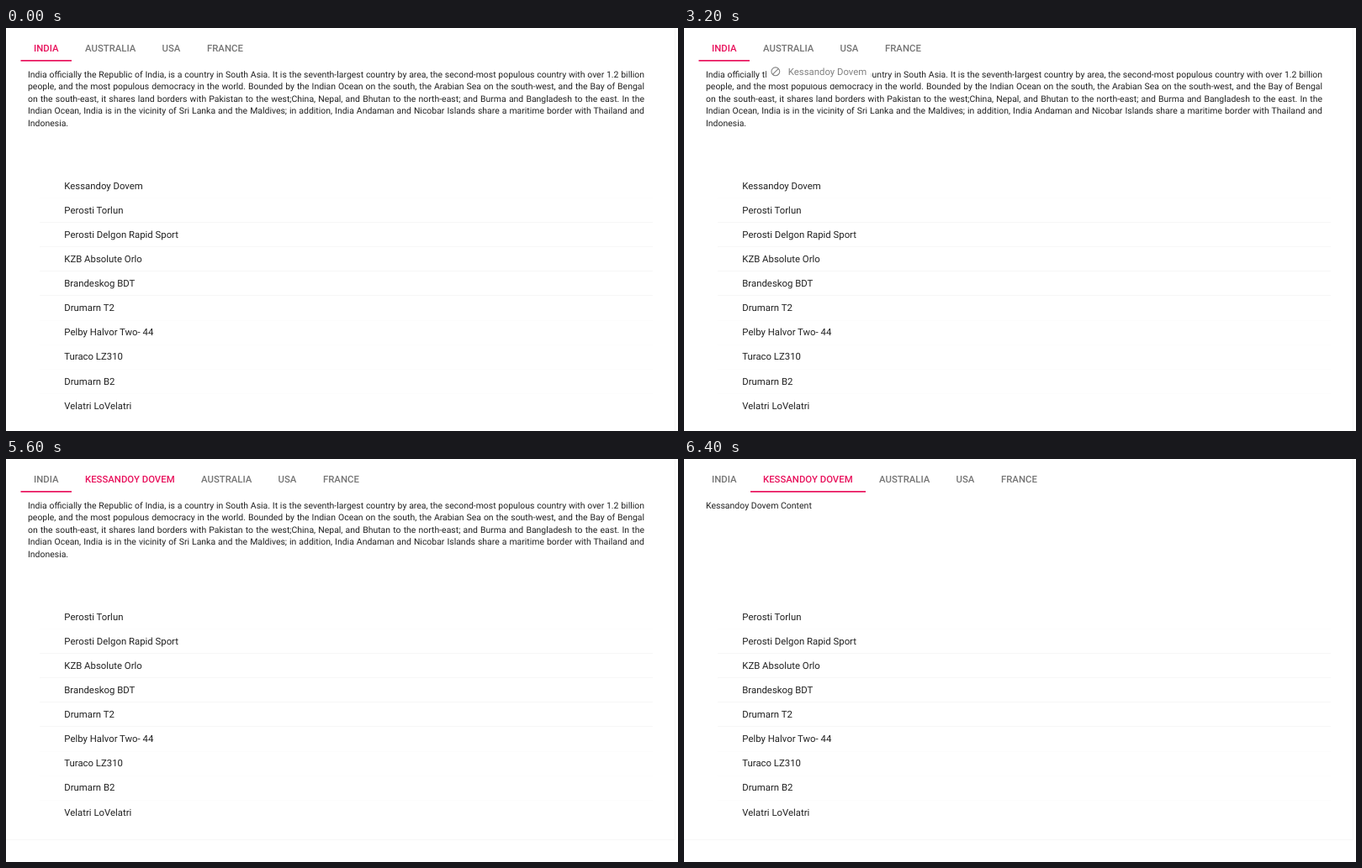
An HTML page that plays this animation: 799 px wide and 480 px high, repeating every 9900 ms.

```html
<!DOCTYPE html>
<html lang="en">
<head>
<meta charset="utf-8">
<title>Drag list item to tabs</title>
<style>
html, body { margin: 0; width: 100%; height: 100%; overflow: hidden; background: #fff; }
svg { display: block; width: 799px; height: 480px; text-rendering: geometricPrecision; }
svg, .para { font-family: Roboto, Arial, sans-serif; }
text { font-size: 11.36px; fill: #212121; white-space: pre; }
.tab { font-weight: 500; }
.note { font-size: 12.35px; }
.para { font-size: 10.45px; line-height: 14.55px; color: #212121; text-align: justify; text-align-last: justify; }
.para div { white-space: nowrap; }
.para div:last-child { text-align-last: left; }
</style>
</head>
<body>
<svg id="stage" viewBox="0 0 799 480">
  <defs>
    <clipPath id="panel"><rect id="panelBox" x="17" y="42" width="752" height="80"/></clipPath>
  </defs>
  <g id="tabs"></g>
  <rect id="indicator" y="38" height="1.7" fill="#e8125c"/>
  <g clip-path="url(#panel)">
    <g id="slider">
      <foreignObject id="country" x="26" y="48.5" width="733" height="74">
        <div class="para" xmlns="http://www.w3.org/1999/xhtml">
          <div>India officially the Republic of India, is a country in South Asia. It is the seventh-largest country by area, the second-most populous country with over 1.2 billion</div>
          <div>people, and the most populous democracy in the world. Bounded by the Indian Ocean on the south, the Arabian Sea on the south-west, and the Bay of Bengal</div>
          <div>on the south-east, it shares land borders with Pakistan to the west;China, Nepal, and Bhutan to the north-east; and Burma and Bangladesh to the east. In the</div>
          <div>Indian Ocean, India is in the vicinity of Sri Lanka and the Maldives; in addition, India Andaman and Nicobar Islands share a maritime border with Thailand and</div>
          <div>Indonesia.</div>
        </div>
      </foreignObject>
      <text id="newContent" x="759" y="59.2" style="font-size:10.5px"></text>
    </g>
  </g>
  <g id="hover">
    <rect x="18" y="175" width="386" height="25.5" fill="#f6f6f6"/>
    <rect x="38" y="175" width="1" height="25.5" fill="#dcdcdc"/>
  </g>
  <g id="page">
    <path id="frame" fill="none" stroke="#f7f7f7"/>
    <g id="lines"></g>
    <g id="rows"></g>
    <text class="note" x="-11" y="495.5">The</text>
    <text x="17" y="495.5" style="fill:#e8125c">Tab</text>
    <text class="note" x="43" y="495.5">is a content panel to show multiple contents in specific space one at a time.</text>
  </g>
  <g id="clone">
    <rect x="107.5" y="64" width="125" height="29" fill="#fff"/>
    <g id="denied" fill="none" stroke="#858585" stroke-width="1.1">
      <circle cx="118.5" cy="78" r="4.9"/><path d="M115 81.5l7-7"/>
    </g>
    <g id="allowed">
      <circle cx="118.5" cy="78" r="5.2" fill="#6b6b6b"/>
      <path d="M115.7 78h5.6M118.5 75.2v5.6" stroke="#fff" stroke-width="1.4"/>
    </g>
    <text id="cloneText" x="133.5" y="82" style="fill:#808080"></text>
  </g>
</svg>
<script>
const LOOP = 9900, STEP = 100, ROW = 29.1, PINK = '#e8125c', GREY = '#757575';
const names = ['Kessandoy Dovem', 'Perosti Torlun', 'Perosti Delgon Rapid Sport', 'KZB Absolute Orlo',
  'Brandeskog BDT', 'Drumarn T2', 'Pelby Halvor Two- 44', 'Turaco LZ310', 'Drumarn B2', 'Velatri LoVelatri'];
const HOVER = 2000, DRAG = 2200, DROP = 4400, CLICK = 5600, SLIDE = 5717, DONE = 6400;

const $ = id => document.getElementById(id);
const show = (el, on) => el.setAttribute('display', on ? 'inline' : 'none');
const move = (el, x, y) => el.setAttribute('transform', `translate(${x} ${y})`);
const clamp = v => Math.min(1, Math.max(0, v));
const mix = (a, b, p) => a + (b - a) * p;

function add(parent, tag, attrs, text = '') {
  const el = document.createElementNS('http://www.w3.org/2000/svg', tag);
  for (const key in attrs) el.setAttribute(key, attrs[key]);
  el.textContent = text;
  parent.append(el);
  return el;
}

function bezier(x1, y1, x2, y2) {
  const at = (a, b, s) => 3 * (1 - s) ** 2 * s * a + 3 * (1 - s) * s * s * b + s ** 3;
  return x => {
    if (x <= 0 || x >= 1) return clamp(x);
    let lo = 0, hi = 1;
    for (let i = 0; i < 24; i++) {
      const mid = (lo + hi) / 2;
      if (at(x1, x2, mid) < x) lo = mid; else hi = mid;
    }
    return at(y1, y2, lo);
  };
}
const ease = bezier(.25, .1, .25, 1);
const glide = bezier(.35, 0, .25, 1);

const addTab = (label, x) => add($('tabs'), 'text', { class: 'tab', x, y: 27.6, style: `fill:${GREY}` }, label);
const india = addTab('INDIA', 33);
const newTab = addTab(names[0].toUpperCase(), 94);
const laterTabs = [['AUSTRALIA', 94], ['USA', 185.6], ['FRANCE', 239]].map(t => addTab(...t));
const rows = names.map(name => add($('rows'), 'text', { x: 69.3 }, name));
const lines = names.map((_, i) => add($('lines'), 'rect', { x: 40, y: Math.round(202 + i * ROW), width: 729, height: 1 }));
$('cloneText').textContent = names[0];
$('newContent').textContent = names[0] + ' Content';

// Offset of the dragged copy from its resting place over the paragraph.
function dragOffset(t) {
  if (t < 3000) {
    const p = clamp((t - DRAG) / 500);
    return [mix(13, 0, p), mix(79, 0, p)];
  }
  const p = 1 - (1 - clamp((t - 2900) / 900)) ** 2;
  return [mix(0, -17.4, p) - 1.2 * clamp((t - 3900) / 200), mix(0, -47.2, p)];
}

function render(t) {
  const dropped = t >= DROP, clicked = t >= CLICK;
  const sliding = t >= 5700 && t < DONE;

  india.style.fill = clicked ? GREY : PINK;
  newTab.style.fill = clicked ? PINK : '#000';
  show(newTab, dropped);
  laterTabs.forEach(tab => move(tab, dropped ? 138 : 0, 0));

  const left = mix(17.5, 79, glide((t - SLIDE) / 125));
  const right = mix(78, 216, glide((t - SLIDE) / 250));
  $('indicator').setAttribute('x', left);
  $('indicator').setAttribute('width', right - left);

  move($('slider'), -733 * ease((t - SLIDE) / 600), 0);
  show($('country'), t < DONE);
  show($('newContent'), t >= SLIDE);
  $('panelBox').setAttribute('height', sliding ? 64 : 80);

  const hovering = t >= HOVER && t < DRAG;
  show($('hover'), hovering);
  rows[0].style.fill = hovering ? '#000' : '';
  show(rows[0], !dropped);
  rows.forEach((row, i) => row.setAttribute('y', 191.7 + (i - dropped) * ROW));
  lines.forEach((line, i) => {
    const strong = sliding ? i < 3 : i > 0 && i < 5;
    line.setAttribute('fill', strong ? '#f7f7f7' : '#fdfdfd');
    show(line, i < rows.length - 1 - dropped);
  });
  $('frame').setAttribute('d', `M795.5 0V${dropped ? 453.5 : 490.5}H0`);
  move($('page'), 0, sliding ? -8.7 : 0);

  const dragging = t >= DRAG && t < DROP;
  show($('clone'), dragging);
  if (dragging) {
    const [x, y] = dragOffset(t);
    move($('clone'), x, y);
    show($('allowed'), y < -36);
    show($('denied'), y >= -36);
  }
}

const start = performance.now();
function tick() {
  const t = (performance.now() - start) % LOOP;
  render(Math.floor(t / STEP) * STEP);
  requestAnimationFrame(tick);
}
tick();
</script>
</body>
</html>
```
